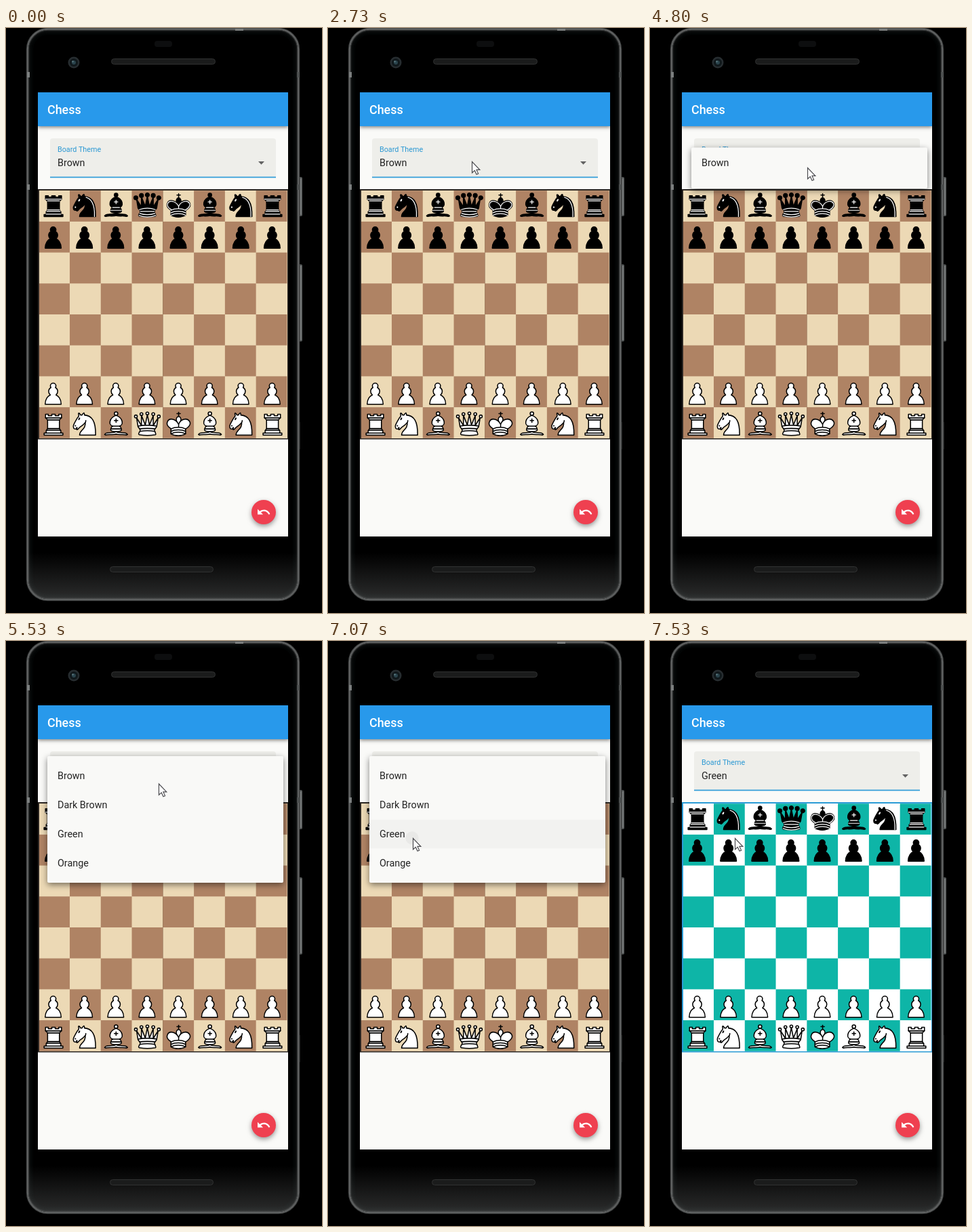
An HTML page with a canvas for the animation above (8000 ms loop, 466x864 px).

```html
<!DOCTYPE html>
<html lang="en">
<head>
<meta charset="utf-8">
<title>Chess board themes</title>
<style>
html, body { margin: 0; width: 100%; height: 100%; overflow: hidden; background: #000; }
canvas { display: block; width: 466px; height: 864px; }
</style>
</head>
<body>
<canvas id="stage" width="466" height="864"></canvas>
<script>
const ctx = document.getElementById('stage').getContext('2d');
const LOOP = 8000, FPS = 15;
const FONT = 'Roboto, "Open Sans", sans-serif';
const THEMES = {
  Brown: { light: '#ecd9b5', dark: '#af8364', edge: '#2b2622', seam: 'rgba(90,55,30,.3)' },
  Green: { light: '#ffffff', dark: '#0eb5a7', edge: '#2a9bd6' }
};
const ITEMS = ['Brown', 'Dark Brown', 'Green', 'Orange'];
const MENU_OPEN = 4716, PRESS = 6985, MENU_CLOSE = 7205, BOARD_OUT = 7180, BOARD_IN = 7340;

const crown = r => [[6, 12], [14, 8.7], [22.5, 7.8], [31, 8.7], [39, 12]]
  .map(([x, y]) => `M${x + r} ${y}a${r} ${r} 0 1 1-${2 * r} 0 ${r} ${r} 0 1 1 ${2 * r} 0z`).join('');

// Pieces live in a 45-unit box: body, detail lines, detail lines on black, solid dots, extra body on black.
const PIECES = {
  p: { body: 'M22 9c-2.21 0-4 1.79-4 4 0 .89.29 1.71.78 2.38C16.83 16.5 15.5 18.59 15.5 21c0 2.03.94 3.84 2.41 5.03C14.91 27.09 10.5 31.58 10.5 39.5H33.5c0-7.92-4.41-12.41-7.41-13.47C27.56 24.84 28.5 23.03 28.5 21c0-2.41-1.33-4.5-3.28-5.62.49-.67.78-1.49.78-2.38 0-2.21-1.79-4-4-4z' },
  r: {
    body: 'M9 39h27v-3H9zM12 36v-4h21v4zM12.5 32l1.5-2.5h17l1.5 2.5zM14 29.5V17h17v12.5zM14 17l-3-3h23l-3 3zM11 14V9h4v2h5V9h5v2h5V9h4v5z',
    inner: 'M12 35.5h21M13 31.5h19M14 29.5h17M14 16.5h17M11 14h23'
  },
  n: {
    body: 'M22 10c10.5 1 16.5 8 16 29H15c0-9 10-6.5 8-21M24 18c.38 2.91-5.55 7.37-8 9-3 2-2.82 4.34-5 4-1.04-.94 1.41-3.04 0-3-1 0 .19 1.23-1 2-1 0-4 1-4-4 0-2 6-12 6-12s1.89-1.9 2-3.5c-.73-1-.5-2-.5-3 1-1 3 2.5 3 2.5h2s.78-2 2.5-3c1 0 1 3 1 3',
    dots: 'M9.5 25.5a.5.5 0 1 1-1 0 .5.5 0 1 1 1 0zM14.93 15.75a.5 1.5 30 1 1-.87-.5.5 1.5 30 1 1 .87.5z',
    inner: 'M24.4 11.3c3.4 1 6.2 2.7 8.6 7.1S36.9 29 36.4 39'
  },
  b: {
    body: 'M9 36c3.39-.97 10.11.43 13.5-2 3.39 2.43 10.11 1.03 13.5 2 0 0 1.65.54 3 2-.68.97-1.65.99-3 .5-3.39-.97-10.11.46-13.5-1-3.39 1.46-10.11.03-13.5 1-1.35.49-2.32.47-3-.5 1.35-1.94 3-2 3-2zM15 32c2.5 2.5 12.5 2.5 15 0 .5-1.5 0-2 0-2 0-2.5-2.5-4-2.5-4 5.5-1.5 6-11.5-5-15.5-11 4-10.5 14-5 15.5 0 0-2.5 1.5-2.5 4 0 0-.5.5 0 2zM25 8a2.5 2.5 0 1 1-5 0 2.5 2.5 0 1 1 5 0z',
    lines: 'M17.5 26h10M15 30h15M22.5 15.5v5M20 18h5'
  },
  q: {
    body: crown(2) + 'M9 26c8.5-1.5 21-1.5 27 0l2-12-7 11V11l-5.5 13.5-3-15-3 15-5.5-14V25L7 14zM9 26c0 2 1.5 2 2.5 4 1 1.5 1 1 .5 3.5-1.5 1-1.5 2.5-1.5 2.5-1.5 1.5.5 2.5.5 2.5 6.5 1 16.5 1 23 0 0 0 1.5-1 0-2.5 0 0 .5-1.5-1-2.5-.5-2.5-.5-2 .5-3.5 1-2 2.5-2 2.5-4-8.5-1.5-18.5-1.5-27 0z',
    lines: 'M11.5 30c3.5-1 18.5-1 22 0M12 33.5c6-1 15-1 21 0',
    inner: 'M11 29a35 35 0 0 1 23 0M12.5 31.5h20M11.5 34.5a35 35 0 0 0 22 0M10.5 37.5a35 35 0 0 0 24 0',
    bold: crown(2.75)
  },
  k: {
    body: 'M22.5 11.6V6M20 8h5M22.5 25s4.5-7.5 3-10.5c0 0-1-2.5-3-2.5s-3 2.5-3 2.5c-1.5 3 3 10.5 3 10.5M11.5 37c5.5 3.5 15.5 3.5 21 0v-7s9-4.5 6-10.5c-4-6.5-13.5-3.5-16 4V27v-3.5c-3.5-7.5-13-10.5-16-4-3 6 5 10 5 10z',
    lines: 'M11.5 30c5.5-3 15.5-3 21 0M11.5 33.5c5.5-3 15.5-3 21 0M11.5 37c5.5-3 15.5-3 21 0',
    inner: 'M11.5 30c5.5-3 15.5-3 21 0M11.5 33.5c5.5-3 15.5-3 21 0M11.5 37c5.5-3 15.5-3 21 0M32 29.5s8.5-4 6-9.65C34.15 14 25 18 22.5 24.5v2.1-2.1C20 18 9.9 14 7 19.85c-2.5 5.65 4.85 9 4.85 9'
  }
};
// Bodies are split so that each part paints over the one before it.
for (const piece of Object.values(PIECES))
  for (const [part, d] of Object.entries(piece))
    piece[part] = part === 'body' ? d.split(/(?=M)/).map(s => new Path2D(s)) : new Path2D(d);

const UNDO = new Path2D('M12.5 8c-2.65 0-5.05.99-6.9 2.6L2 7v9h9l-3.62-3.62c1.39-1.16 3.16-1.88 5.12-1.88 3.54 0 6.55 2.31 7.6 5.5l2.37-.78C21.08 11.03 17.15 8 12.5 8z');
const ARROW = new Path2D('M.5.5V16.8L4.3 13.4 7 19.3 9.6 18.1 7 12.4H11.8z');

// Pointer stops: time, x, y
const STOPS = [
  [460, 42, 169], [667, 152, 210], [933, 152, 210], [1000, 156, 207], [1270, 180, 176],
  [1600, 197, 185], [2467, 197, 185], [2733, 212, 197], [3200, 232, 206],
  [5467, 232, 206], [6333, 140, 265], [6667, 125, 291], [LOOP, 125, 291]
];

const clamp = v => Math.max(0, Math.min(1, v));
const ramp = (t, from, span) => clamp((t - from) / span);
const mix = (a, b, k) => a + (b - a) * k;

function rect(x, y, w, h, color) {
  ctx.fillStyle = color;
  ctx.fillRect(x, y, w, h);
}

function round(x, y, w, h, r, fill, stroke, width = 1) {
  ctx.beginPath();
  ctx.roundRect(x, y, w, h, r);
  if (fill) { ctx.fillStyle = fill; ctx.fill(); }
  if (stroke) { ctx.strokeStyle = stroke; ctx.lineWidth = width; ctx.stroke(); }
}

function disc(x, y, r, color) {
  ctx.beginPath();
  ctx.arc(x, y, r, 0, 7);
  ctx.fillStyle = color;
  ctx.fill();
}

function text(str, x, y, size, color, weight = 400) {
  ctx.font = `${weight} ${size}px ${FONT}`;
  ctx.fillStyle = color;
  ctx.fillText(str, x, y);
}

function withShadow(alpha, blur, dy, draw) {
  ctx.save();
  ctx.shadowColor = `rgba(0,0,0,${alpha})`;
  ctx.shadowBlur = blur;
  ctx.shadowOffsetY = dy;
  draw();
  ctx.restore();
}

function fade(y0, y1, from, to) {
  const g = ctx.createLinearGradient(0, y0, 0, y1);
  g.addColorStop(0, from);
  g.addColorStop(1, to);
  return g;
}

function drawPhone() {
  rect(0, 0, 466, 864, '#000');
  for (const [y, h] of [[220, 58], [349, 114]]) {
    round(430, y, 7, h, 2, '#505353');
    rect(434, y + 2, 1.5, h - 4, '#808383');
  }
  rect(432, 582, 2, 40, '#1d1e1e');
  // Metal rim: bright near the edge, falling off inwards
  for (let i = 0; i < 10; i++) {
    const v = 16 * (1 - i / 10) + 92 * Math.exp(-((i - 1.5) ** 2) / 3);
    round(30.5 + i, .5 + i, 402 - 2 * i, 845 - 2 * i, 31 - i, '#000', `rgb(${v},${v + 2},${v + 2})`, 1.4);
  }
  round(33, 3, 397, 840, 28, fade(775, 845, 'rgba(110,112,112,0)', 'rgba(110,112,112,.4)'));
  for (const y of [65, 231]) {
    rect(31, y, 4, 8, '#7c7f7f');
    rect(429, y, 4, 8, '#4c4f4f');
  }
  rect(338, 1, 12, 3, '#7c7f7f');
  round(155.5, 45.5, 153, 8, 4, '#1b1c1c', '#303131');
  round(153.5, 795.5, 152, 8, 4, '#1b1c1c', '#303131');
  round(219, 19, 26, 9, 4, '#0d0e0f');
  disc(100, 51, 8.5, '#272d30');
  disc(100, 51, 6, '#10181b');
  disc(100, 51, 3, '#2a434c');
  disc(98.5, 49.5, 1.2, '#5c7a80');
}

function drawField(value) {
  round(65, 163, 333, 58, [4, 4, 0, 0], '#eeeeea');
  rect(65, 219.6, 333, 1.7, '#2f9cd8');
  text('Board Theme', 76, 183, 10.75, '#2b98d3');
  text(value, 76, 204, 14.33, '#222');
  ctx.beginPath();
  ctx.moveTo(372, 197);
  ctx.lineTo(381, 197);
  ctx.lineTo(376.5, 201.7);
  ctx.fillStyle = '#626262';
  ctx.fill();
}

function drawBoard({ light, dark, edge, seam }) {
  const x0 = 48.2, y0 = 240.2, w = 45.78, h = 45.7;
  rect(47, 238, 369, 369.5, edge);
  rect(49, 240, 366, 366, light);
  for (let r = 0; r < 8; r++)
    for (let c = 1 - r % 2; c < 8; c += 2) {
      const x = Math.max(49, x0 + c * w);
      rect(x, y0 + r * h, x0 + (c + 1) * w - x, h, dark);
    }
  if (seam) rect(231, 240, 1, 366, seam);
}

function drawPiece(kind, col, row, black) {
  const { body, lines, inner, dots, bold } = PIECES[kind];
  const unit = 46.125;
  ctx.save();
  ctx.translate(47 + col * unit, 238.5 + row * unit);
  ctx.scale(unit / 45, unit / 45);
  ctx.lineJoin = ctx.lineCap = 'round';
  ctx.lineWidth = 1.5;
  ctx.strokeStyle = '#000';
  ctx.fillStyle = black ? '#000' : '#fff';
  for (const part of black && bold ? [...body, bold] : body) {
    ctx.fill(part);
    ctx.stroke(part);
  }
  const detail = black ? inner || lines : lines;
  ctx.strokeStyle = ctx.fillStyle = black ? '#fff' : '#000';
  if (black) ctx.lineWidth = 1.2;
  if (detail) ctx.stroke(detail);
  if (dots) { ctx.lineWidth = 1; ctx.fill(dots); ctx.stroke(dots); }
  ctx.restore();
}

function drawPieces() {
  [...'rnbqkbnr'].forEach((kind, c) => {
    drawPiece(kind, c, 0, true);
    drawPiece('p', c, 1, true);
    drawPiece('p', c, 6, false);
    drawPiece(kind, c, 7, false);
  });
}

function drawButton() {
  withShadow(.4, 7, 3, () => disc(380, 715, 18, '#ef4050'));
  ctx.save();
  ctx.translate(369.25, 704.25);
  ctx.scale(.896, .896);
  ctx.fillStyle = '#fff';
  ctx.fill(UNDO);
  ctx.restore();
}

function drawMenu(t) {
  const p = ramp(t, MENU_OPEN, 300);
  const alpha = clamp(p / .25) * (1 - ramp(t, MENU_CLOSE, 75));
  if (!alpha) return;
  const grow = clamp((p - .25) / .25);
  const top = mix(177.5, 170, grow), bottom = mix(220.5, 357, grow);
  ctx.save();
  ctx.globalAlpha = alpha;
  withShadow(.5, 10, 3, () => round(61, top, 348, bottom - top, 2, '#f9f9f7'));
  ctx.beginPath();
  ctx.rect(61, top, 348, bottom - top);
  ctx.clip();
  if (t >= PRESS) {
    ctx.save();
    ctx.beginPath();
    ctx.rect(61, 264, 348, 42.5);
    ctx.clip();
    const press = ramp(t, PRESS, 150);
    rect(61, 264, 348, 43, `rgba(0,0,0,${.047 * press})`);
    disc(124, 291, 4 + (t - PRESS) * .07, `rgba(0,0,0,${.075 * press})`);
    ctx.restore();
  }
  const unit = .5 / (ITEMS.length + 1.5);
  ITEMS.forEach((name, i) => {
    const shown = i ? ramp(p, .5 + (i + 1) * unit - 1e-6, 1.5 * unit) : 1;
    ctx.globalAlpha = alpha * shown;
    text(name, 76, 204 + 43 * i, 14.33, '#222');
  });
  ctx.restore();
}

function drawPointer(t) {
  const i = STOPS.findIndex(s => s[0] > t);
  if (i < 1) return;
  const [t0, x0, y0] = STOPS[i - 1], [t1, x1, y1] = STOPS[i];
  const k = ramp(t, t0, t1 - t0);
  ctx.save();
  ctx.translate(mix(x0, x1, k), mix(y0, y1, k));
  ctx.fillStyle = '#fff';
  ctx.strokeStyle = '#4c4c50';
  ctx.lineWidth = 1.2;
  ctx.fill(ARROW);
  ctx.stroke(ARROW);
  ctx.restore();
}

function draw(t) {
  drawPhone();
  ctx.save();
  ctx.beginPath();
  ctx.rect(47, 95, 369, 656);
  ctx.clip();
  rect(47, 95, 369, 656, '#fafaf8');
  withShadow(.45, 5, 2, () => rect(47, 95, 369, 50, '#2899eb'));
  text('Chess', 61, 127, 17.9, '#fff', 500);
  drawField(t < BOARD_OUT ? 'Brown' : 'Green');
  if (t < BOARD_OUT) drawBoard(THEMES.Brown);
  else if (t >= BOARD_IN) drawBoard(THEMES.Green);
  drawPieces();
  drawButton();
  drawMenu(t);
  ctx.restore();
  drawPointer(t);
}

// Motion runs at a fixed tick, so time is snapped to it.
function tick() {
  const step = Math.floor((performance.now() % LOOP + 5) * FPS / 1000);
  draw(step * 1000 / FPS % LOOP);
  requestAnimationFrame(tick);
}
tick();
</script>
</body>
</html>
```
